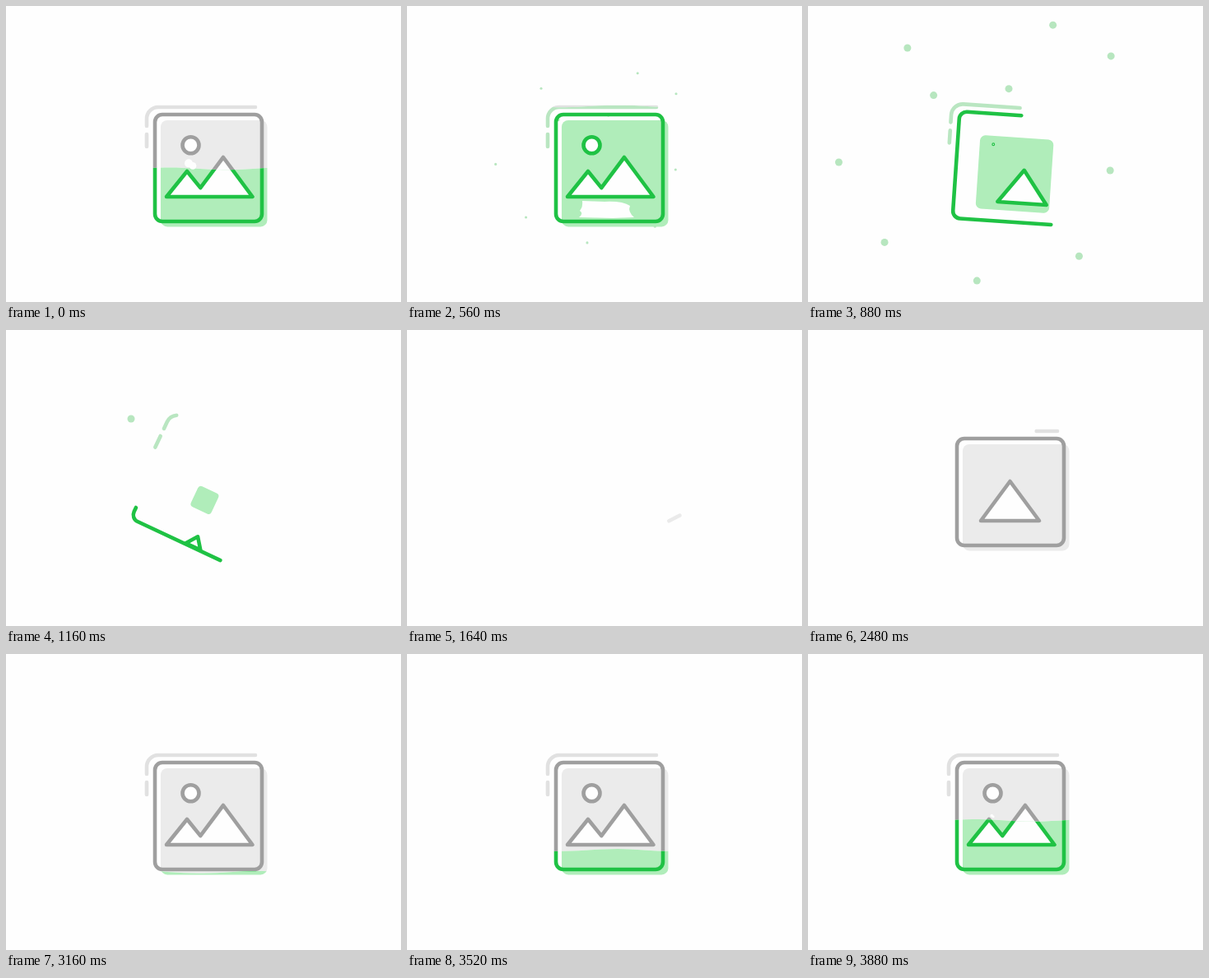
Recreate the animation shown at these times as an HTML page. Size 480 px wide and 360 px high, loop 3.92 s.

```html
<!DOCTYPE html>
<html lang="en">
<head>
<meta charset="utf-8">
<title>Picture placeholder</title>
<style>
html, body { margin: 0; width: 100%; height: 100%; overflow: hidden; background: #fefefe; }
svg { display: block; width: 480px; height: 360px; }
.line { stroke-width: 4.6; stroke-linecap: round; stroke-linejoin: round; fill: none; }
.gray .line { stroke: #9f9f9f; }
.gray .fill { fill: #ebebeb; }
.gray .dash { stroke: #e1e1e1; }
.green .line { stroke: #1fc244; }
.green .fill { fill: #b0edba; }
.green .dash { stroke: #b9e6c1; }
.line.white { fill: #fefefe; }
</style>
</head>
<body>
<svg viewBox="0 0 480 360">
  <defs>
    <clipPath id="dry"><path id="dryPath"/></clipPath>
    <clipPath id="wet"><path id="wetPath"/></clipPath>
  </defs>
  <g id="dots" fill="#b7e6bf"></g>
  <g class="gray" clip-path="url(#dry)"><g class="icon"></g></g>
  <g class="green" clip-path="url(#wet)"><g class="icon"></g></g>
  <g id="bubble" fill="#fefefe"><circle cx="-2" cy="-1" r="5"/><circle cx="3" cy="2" r="4.3"/></g>
  <path id="gap" fill="#fefefe" d="M213 237 L240 238 Q262 237 271 243 Q268 250 276 257 L250 258 L209 257 Q215 252 210 249 Q214 244 213 237Z"/>
</svg>
<script>
const LOOP = 3920;
const RIM = 504.5;
const TRAIL = 174;
const $ = id => document.getElementById(id);
const clamp = v => Math.max(0, Math.min(1, v));
const span = (t, a, b) => clamp((t - a) / (b - a));
const mix = (a, b, k) => a + (b - a) * k;
const smooth = k => k * k * (3 - 2 * k);
const easeOut = k => 1 - (1 - k) ** 3;

const parts = `
  <rect class="fill"/>
  <path class="line white peaks"/>
  <circle class="line white sun" cx="224.5" cy="169.3"/>
  <path class="line rim" d="M301 262 H190 A9 9 0 0 1 181 253 V141 A9 9 0 0 1 190 132 H302 A9 9 0 0 1 311 141 V253 A9 9 0 0 1 302 262 Z"/>
  <path class="line dash top" d="M303 123 H185 A14 14 0 0 0 171 137 V146"/>
  <path class="line dash side" d="M171 156 V171"/>`;

const icons = [...document.querySelectorAll('.icon')].map(g => {
  g.innerHTML = parts;
  const q = s => g.querySelector(s);
  return { g, fill: q('.fill'), peaks: q('.peaks'), sun: q('.sun'), rim: q('.rim'), top: q('.top'), side: q('.side') };
});

// Where each burst dot ends up
const burst = [[152, 108], [369, 60], [244, 100], [298, 22], [120, 50], [36, 190], [92, 288], [205, 335], [330, 305], [368, 200]];
const dots = burst.map(() => {
  const c = document.createElementNS('http://www.w3.org/2000/svg', 'circle');
  $('dots').append(c);
  return c;
});

function set(el, attrs) {
  for (const k in attrs) el.setAttribute(k, attrs[k]);
}

function show(el, on) {
  el.style.display = on ? '' : 'none';
}

// Show only the stretch a..b of a path
function trim(el, a, b) {
  show(el, b - a > 0.1);
  set(el, { 'stroke-dasharray': `${Math.max(0, b - a)} 2000`, 'stroke-dashoffset': -a });
}

function waterLevel(t) {
  if (t >= 600 && t < 1500) return -20;
  if (t >= 1500 && t < 3100) return 400;
  const s = (t < 600 ? t + LOOP : t) - 3100;
  return 269 - 0.0575 * s - 3.55e-5 * s * s;
}

function drawWater(level, t) {
  let edge = '';
  for (let x = 0; x <= 480; x += 8) {
    edge += `L${x} ${level + 1.4 * Math.sin(x / 22 + t * Math.PI * 8 / LOOP + 2)}`;
  }
  set($('dryPath'), { d: `M0 -50${edge}L480 -50Z` });
  set($('wetPath'), { d: `M0 420${edge}L480 420Z` });
}

// Outline of two overlapping hills with peaks at big and small
function hills(big, small) {
  const left = Math.min(big - 35.5, small - 25);
  const valley = (1.34 * big + 1.24 * small - 17) / 2.58;
  const apart = valley > small;
  const notch = apart ? `L${small} 201L${valley} ${201 + 1.24 * (valley - small)}` : '';
  return `M${left} 232${notch}L${big} 184L${big + 35.5} 232Z`;
}

function pose(t) {
  if (t < 1500) {
    return {
      turn: 25 * (Math.max(0, t - 700) / 460) ** 2,
      fill: 1 - span(t, 700, 1285),
      rim: RIM * (1 - span(t, 600, 1357)),
      rimAlpha: 1,
      trail: [TRAIL * span(t, 700, 1340), TRAIL],
      sun: 1 - smooth(span(t, 650, 950)),
      big: 264,
      small: mix(220, 264, smooth(span(t, 640, 920))),
      hill: 1 - span(t, 800, 1300),
    };
  }
  const slide = smooth(span(t, 2480, 2780));
  return {
    turn: -30.7 * (1 - span(t, 1600, 2240)) ** 2,
    fill: easeOut(span(t, 1900, 2340)),
    rim: RIM * span(t, 1622, 2270),
    rimAlpha: span(t, 1620, 1720),
    trail: [0, TRAIL * span(t, 2430, 2780)],
    sun: easeOut(span(t, 2600, 2860)),
    big: mix(245.5, 264, slide),
    small: mix(245.5, 220, slide),
    hill: easeOut(span(t, 2180, 2440)),
  };
}

function drawIcon(p) {
  const size = 129.5 * p.fill;
  const [a, b] = p.trail;
  for (const i of icons) {
    set(i.g, { transform: `rotate(${p.turn} 240 180)` });
    show(i.fill, size > 0.5);
    set(i.fill, { x: 252.7 - size / 2, y: 203.7 - size / 2, width: size, height: size, rx: 3 + 5 * p.fill });
    show(i.peaks, p.hill > 0.03);
    const y = mix(272, 0, p.hill) - 0;
    set(i.peaks, {
      d: hills(p.big, p.small),
      transform: `translate(${p.big * (1 - p.hill)} ${y}) scale(${p.hill})`,
      'vector-effect': 'non-scaling-stroke',
    });
    show(i.sun, p.sun > 0.02);
    set(i.sun, { r: 10 * p.sun });
    i.sun.style.strokeWidth = 4.6 * Math.min(1, p.sun * 2);
    trim(i.rim, 0, p.rim);
    set(i.rim, { opacity: p.rimAlpha });
    trim(i.top, Math.min(a, 149), Math.min(b, 149));
    trim(i.side, Math.max(0, a - 159), Math.max(0, b - 159));
  }
}

function drawDots(t) {
  burst.forEach(([x, y], n) => {
    const k = mix(0.62, 1, easeOut(span(t, 545, 1000)));
    const end = n ? 1120 : 1260;
    const r = 4.5 * span(t, 520, 640) * (1 - span(t, end - 90, end));
    show(dots[n], r > 0.05 && t < 1300);
    set(dots[n], { cx: mix(246, x, k), cy: mix(197, y, k), r });
  });
}

function draw(t) {
  const level = waterLevel(t);
  drawWater(level, t);
  drawIcon(pose(t));
  drawDots(t);
  const late = t > 3000 ? t - LOOP : t;
  show($('bubble'), late > -50 && late < 170);
  set($('bubble'), { transform: `translate(224 ${level - 5.5}) scale(${span(late, -60, 0)})` });
  show($('gap'), t >= 540 && t < 600);
}

function tick(now) {
  draw(now % LOOP);
  requestAnimationFrame(tick);
}
draw(0);
requestAnimationFrame(tick);
</script>
</body>
</html>
```
